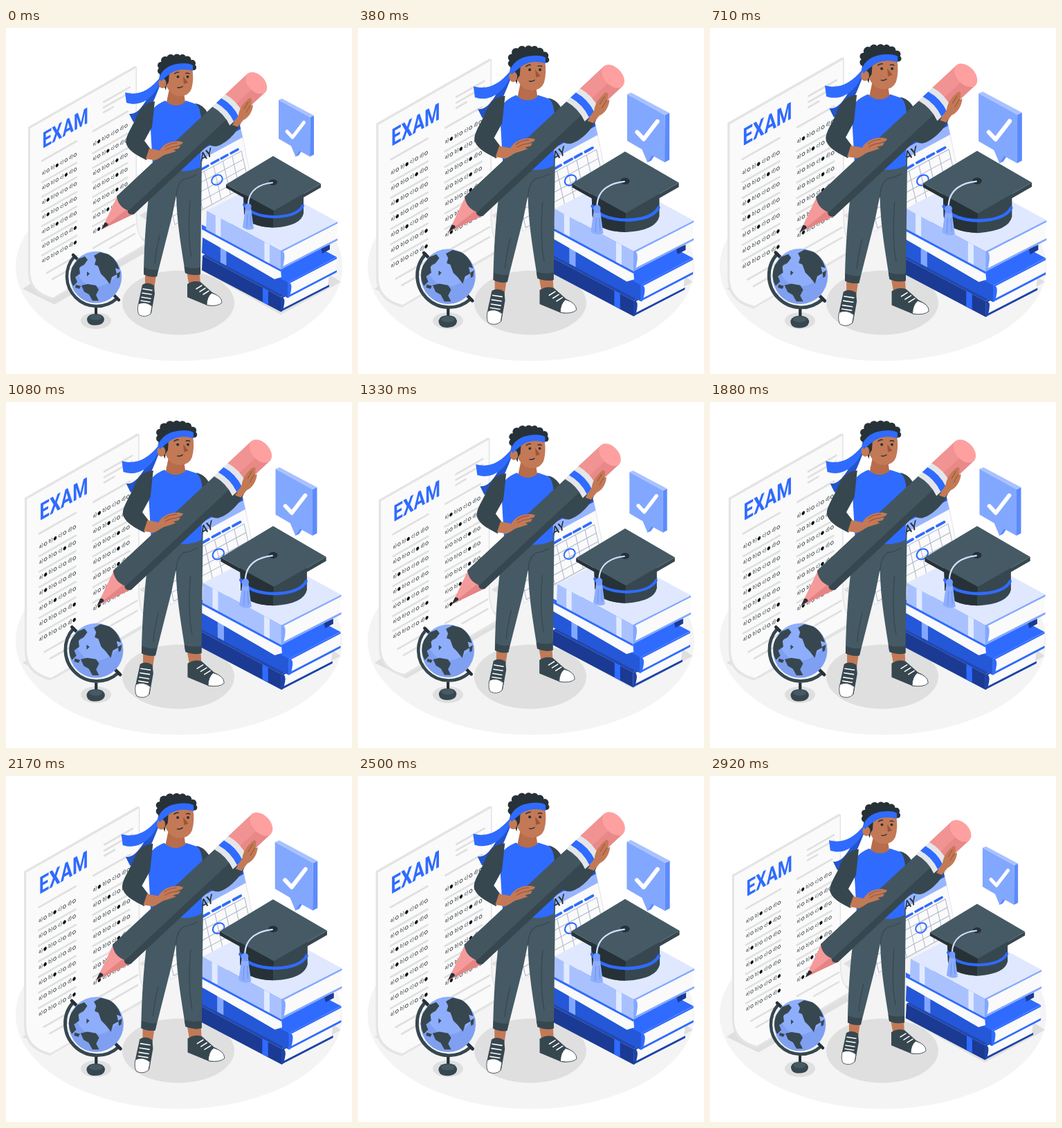
Animation, 500 px wide and 500 px high, one loop 2960 ms. Source, as an HTML page:

```html
<!DOCTYPE html>
<html lang="en">
<head>
<meta charset="utf-8">
<title>Exam time</title>
<style>
html,body{margin:0;width:100%;height:100%;overflow:hidden;background:#fff}
svg{display:block;width:100vw;height:100vh}
text{font-family:Roboto,"Open Sans",sans-serif}
.n{fill:none;stroke-linecap:round;stroke-linejoin:round}
.skin{fill:#c37956}
</style>
</head>
<body>
<svg viewBox="0 0 500 500">
<!-- floor -->
<ellipse cx="250" cy="345" rx="236" ry="136" fill="#f4f4f4"/>
<ellipse cx="249" cy="397" rx="81" ry="46.5" fill="#dfdfdf"/>
<ellipse cx="130" cy="423" rx="22" ry="12" fill="#dfdfdf"/>
<path d="M24 377L70 399.500 215 317 180 290 36 369zM280 349L397 414 484 367 466 355 370 330zM193 271L208 262 240 280 222 290z" fill="#dfdfdf"/>

<g id="exam">
  <path d="M32 143L186 55 189 56 189 268C189 295 195 307 206 313L67 393C46 387 32 377 32 350z" fill="#e4e4e4"/>
  <path d="M35 145L187.500 58 187.500 268C187.500 294 193 305 203 311L68 389.500C48 384 35 374 35 350z" fill="#fafafa"/>
  <path id="rules" class="n" stroke="#e0e0e0" stroke-width="2.600"/>
  <text transform="matrix(.755,-.43,0,1,52.500,174.500)" font-size="32" font-weight="bold" fill="#2f6bff">EXAM</text>
  <g id="answers" fill="#263238"></g>
</g>

<g id="calendar">
  <path d="M224 196L337 136 342 158 353 212 356 222 240 289 229 218z" fill="#fafafa" stroke="#e2e5ec"/>
  <path d="M224 196L337 136 342 158 229 219z" fill="#97b5ff"/>
  <path d="M224 196L337 136 339 146 226 206z" fill="#2456d0"/>
  <text transform="matrix(.866,-.49,.18,1,269,201)" font-size="16.500" font-weight="500" fill="#263238">MAY</text>
  <path id="grid" class="n" stroke="#aeb6cc" stroke-width="1"/>
  <path class="n" stroke="#2f6bff" stroke-width="3.600" stroke-linecap="butt" d="M283 204l9-5M297 196l10-5.500M311 188.500l9-5M325 181l10-5.500"/>
  <ellipse class="n" cx="305" cy="219.500" rx="8.300" ry="6.600" transform="rotate(-35 305 219.500)" stroke="#2f6bff" stroke-width="2"/>
</g>

<g id="globe">
  <path class="n" d="M99 330A43.200 43.200 0 0 0 160 391" stroke="#37474f" stroke-width="4.500"/>
  <path class="n" d="M97 328l6 6M156 386l7 7" stroke="#263238" stroke-width="4.500"/>
  <circle cx="130" cy="360" r="37.300" fill="#8eaefc"/>
  <path d="M98 342C112 390 150 376 166 350C170 376 154 397 130 397.300C100 397 88 368 98 342z" fill="#7f9ff0"/>
  <path d="M96 345L104 334 114 330 118 335 113 342 108 345 111 341 106 347 107 355 100 360 103 367 97 373C92 364 92 354 96 345zM127 329L136 324 148 327C158 333 162 342 164 349L158 347 160 356 153 360 150 370 143 361 137 355 133 344 128 342 130 335zM109 372L118 370 130 372 134 378 130 386 134 394 125 394 120 385 113 381zM101 371l7 2-2 4-6-2zM160 355l5-3-1 8-3 2zM117 352l4 3-4 4z" fill="#37474f"/>
  <path d="M128 404h4v10h-4z" fill="#263238"/>
  <path d="M117 420Q119 413 129.500 413T142 420Q142 429 129.500 429.500T117 420z" fill="#37474f"/>
  <ellipse cx="129.500" cy="418" rx="9" ry="4" fill="#455a64"/>
</g>

<g id="books"></g>

<g id="hat">
  <path d="M343 236L344 268Q350 288 388 288.500Q426 286 430 268V236z" fill="#37474f"/>
  <path d="M343 236L344 268Q350 287 386 288.500V262z" fill="#263238"/>
  <path class="n" d="M344 255Q354 272 388 273Q421 272 429 257" stroke="#2f6bff" stroke-width="4" stroke-linecap="butt"/>
  <path d="M318 226L387 264V269.500L318 231z" fill="#263238"/>
  <path d="M455 225L387 264V269.500L455 230.500z" fill="#37474f"/>
  <path d="M318 226L386 185 455 225 387 264z" fill="#455a64"/>
  <ellipse cx="386" cy="223" rx="6" ry="4.200" fill="#263238"/>
  <path class="n" d="M385 223.500C370 225 350 232 350 256" stroke="#d4e0ff" stroke-width="2"/>
  <path d="M346 260L342 288Q350 294 358 290L354 260z" fill="#8eaefc"/>
  <circle cx="350" cy="258" r="4.600" fill="#7199ff"/>
  <path class="n" d="M346 263h8M349 270l-1 18M353 270l1 16" stroke="#6c92f5" stroke-width="1"/>
</g>

<g id="bubble">
  <path d="M439.500 129L445 126.500V183L439 186z" fill="#5c8bfa"/>
  <path d="M394 104L399 102 445 126.500 439.500 129z" fill="#a9c2ff"/>
  <path d="M418 186L423 184 427 178 420 174z" fill="#5c8bfa"/>
  <path d="M394 104L439.500 129V186L424 177.500 418.500 186 412 170.500 394 160z" fill="#82a7ff"/>
  <path class="n" d="M406 149.500l8 8.500 16.500-21.500" stroke="#fff" stroke-width="5"/>
</g>

<g id="person">
  <!-- ribbons -->
  <path d="M219 76C206 95 196 126 178 124L184 136C206 130 213 106 223 82z" fill="#2354cc"/>
  <path d="M223 71C206 92 190 98 172 93L174 108C196 115 214 100 224 77z" fill="#2f6bff"/>
  <!-- legs and shoes -->
  <path class="skin" d="M201 354L217 357 214 377 201 376zM261 352L280 354 281 372 265 374z"/>
  <path d="M197 371Q205 366 214 372L215 384 210 412Q202 419 192 414Q189 407 192 394z" fill="#37474f"/>
  <path d="M191 399Q201 394 211 402L209 413Q202 419 193 415Q189 411 191 399z" fill="#fff" stroke="#37474f" stroke-width=".8"/>
  <path d="M262 370Q271 364 281 367L298 382Q312 388 312 397Q306 403 291 401L262 389z" fill="#37474f"/>
  <path d="M297 383Q312 387 312 397Q306 403 290 400.500Q290 389 297 383z" fill="#fff" stroke="#37474f" stroke-width=".8"/>
  <path class="n" d="M198 377l13 2M197 383l13 2M196 389l13 2M195 394l13 2M275 377l8-5M280 381l8-5M285 385l8-5" stroke="#fff" stroke-width="1.500"/>
  <path d="M213 192C206 240 200 290 199 356Q208 361 218 359L240 272 246 242C247 285 254 320 259 354Q271 359 281 356L283 190z" fill="#455a64"/>
  <path d="M199.500 346Q210 351 220 349L218 359Q208 361 199 356zM257.500 345Q270 349 281 346V356Q270 359 259 354z" fill="#37474f"/>
  <path class="n" d="M246 243C247 230 250 222 258 218M275 212Q264 218 258 218M222 300Q216 325 215 340M266 250Q262 300 268 330" stroke="#37474f" stroke-width="1.200"/>
  <!-- torso and far arm -->
  <path d="M274 109C290 112 296 130 300 146L321 131 339 138C332 154 316 168 304 171C285 172 280 150 276 140z" fill="#37474f"/>
  <path d="M230 105Q245 116 260 105L275 110Q284 118 282 150L281 201Q264 209 250 206L212 198 208 130Q208 114 230 105z" fill="#2f6bff"/>
  <path d="M236 88L232 107Q246 117 259 107L257 94z" fill="#b76c4b"/>
  <!-- head -->
  <g fill="#263238" id="curls"><path d="M222 70Q222 43 247 42Q270 43 272 58L234 68 231 90z"/></g>
  <path class="skin" d="M231 66Q250 52 269 58Q272 74 268 88Q264 98 252 98.500Q239 98 234 88L229 80z"/>
  <path d="M229 67L236 64 235 78 231 84z" fill="#263238"/>
  <ellipse class="skin" cx="226" cy="80" rx="5.600" ry="7"/>
  <path d="M221 72Q228 54 250 51.500Q264 50 270 54L270 62Q254 57 240 64Q231 70 224 77z" fill="#2f6bff"/>
  <path d="M256 70L263 79 257 81z" fill="#9c5538"/>
  <path class="n" d="M243.500 66q3-2.500 6-2M260 65.500q3-1 5 .5M248 86q4 1 7-1.500" stroke="#263238" stroke-width="1.400"/>
  <g fill="#263238"><circle cx="248.500" cy="70.500" r="1.900"/><circle cx="262.500" cy="70.500" r="1.900"/></g>
  <!-- pencil -->
  <g transform="translate(171 257.500) rotate(-43)">
    <path d="M4 -18L-47 2 4 18z" fill="#f59a9a"/>
    <path d="M4 6L-47 2 4 18z" fill="#e58484"/>
    <path d="M-47 2L-37 -2Q-33 1 -36 4z" fill="#263238"/>
    <path d="M2 -18H198V18H2Q-6 13 0 7Q-7 -5 2 -18z" fill="#37474f"/>
    <path d="M2 -18H198V9L0 9Q-7 -5 2 -18z" fill="#43565f"/>
    <path d="M216 -18.500H262V18.500H216z" fill="#e98888"/>
    <path d="M216 -18.500H262V2H216z" fill="#f29393"/>
    <ellipse cx="261" cy="0" rx="12" ry="18.500" fill="#ffa0a0"/>
    <path d="M191 -18.500H217Q223 0 217 18.500H191Q197 0 191 -18.500z" fill="#e4e6ea"/>
    <path d="M199 -18.500H209Q215 0 209 18.500H199Q205 0 199 -18.500z" fill="#2f6bff"/>
  </g>
  <!-- near arm and hands -->
  <path d="M215 106C200 107 193 116 187 132C180 147 171 159 174 168C178 179 192 185 203 191L209 175 200 163 211 143z" fill="#37474f"/>
  <path class="skin" d="M207 174L222 177C228 167 238 163 250 163.500L256 165 254 168 244 171 252 170 250 174 242 176 246 178 234 182C226 183 220 191 214 191L202 189z"/>
  <path class="skin" d="M327 140L336 126C337 117 342 109 352 101L355 103 354 112 357 111C356 122 350 130 343 133L335 143z"/>
  <path class="n" d="M230 172q7-6 17-6M231 176q8-5 16-5M344 117l6-10M347 122l6-10" stroke="#9c5538" stroke-width="1"/>
</g>
</svg>
<script>
const $ = id => document.getElementById(id);
const poly = (pts, fill) => `<path d="M${pts.join('L')}z" fill="${fill}"/>`;

// exam sheet: ruled lines and answer rows
const SLOPE = -.57;
const rule = (x, y, w) => `M${x} ${y}l${w} ${w * SLOPE}`;
let rules = rule(141, 107, 38) + rule(141, 115, 38) + rule(141, 122, 14) +
  rule(52, 192, 50) + rule(126, 149, 50) + rule(59, 354, 44) + rule(67, 363, 30) +
  rule(126, 318, 60) + rule(150, 318, 36);
let answers = '';
const columns = [[52, 212.5, [1, 2, 0, 0, 1, 3, 3]], [125.500, 170.5, [0, 1, 2, 2, 2, 1, 0]]];
for (const [x, y0, marks] of columns) marks.forEach((mark, r) => {
  const y = y0 + r * 21.1;
  if (r) rules += rule(x, y - 10.5, 50);
  [...'abcd'].forEach((ch, i) => {
    const dx = i * 13.1;
    answers += `<g transform="matrix(.866,-.5,0,1,${x + dx},${y + dx * SLOPE})">
      <text font-size="7">${ch})</text>
      <ellipse cx="10" cy="-1.600" rx="2.100" ry="2.200" fill="${i == mark ? '#000' : 'none'}" stroke="#263238" stroke-width=".8"/></g>`;
  });
});
$('rules').setAttribute('d', rules);
$('answers').innerHTML = answers;

// calendar grid
let grid = '';
for (let i = 0; i < 5; i++) grid += `M${233 + i * 2.7} ${236 + i * 12}l107 -58`;
for (let i = 0; i < 9; i++) grid += `M${233 + i * 13.4} ${236 - i * 7.25}l11 48`;
$('grid').setAttribute('d', grid);

// a book from its front, left and right top corners and its height
function book([fx, fy], [lx, ly], [rx, ry], h, top, spine, cover, band, bands) {
  const at = (k, d) => [fx + (lx - fx) * k, fy + (ly - fy) * k + d];
  const edge = (d, w) => poly([[fx, fy + d], [rx, ry + d], [rx, ry + d + w], [fx, fy + d + w]], cover);
  let s = poly([[fx, fy], [lx, ly], [lx + rx - fx, ly + ry - fy], [rx, ry]], top);
  s += poly([[fx, fy], [rx, ry], [rx - 2, ry + h], [fx, fy + h]], '#fafafa');
  s += edge(0, 2.5) + edge(h - 3, 3);
  s += `<path d="M${fx} ${fy}q7 -1 5 ${h / 2}t-5 ${h / 2}z" fill="${cover}"/>`;
  s += poly([[fx, fy], [lx, ly], [lx - 1, ly + h], [fx, fy + h]], spine);
  for (const k of bands) s += poly([at(k, 0), at(k + .07, 0), at(k + .07, h), at(k, h)], band);
  return s;
}
$('books').innerHTML =
  book([397, 389], [284, 329], [467, 353], 21, '#2148b0', '#1a3a94', '#1d43a8', '#2f6bff', [.16]) +
  book([407, 368], [284, 303], [478, 331], 22, '#2f6bff', '#2458d8', '#2f6bff', '#82a7ff', [.72]) +
  poly([[455, 318], [468, 313], [468, 320], [457, 326]], '#1a3a94') +
  // page edges and cover between the two upper spines
  poly([[285, 290], [397, 350], [398, 360], [388, 363], [285, 303]], '#fafafa') +
  poly([[283, 284], [397, 346], [397, 352], [283, 291]], '#2f6bff') +
  book([397, 322], [290, 264], [479, 280], 27, '#dfe8ff', '#a9c2ff', '#82a7ff', '#e2eaff', [.15, .81]);

// curly hair
const curls = [[224, 62, 5], [224, 54, 5], [230, 47, 6], [238, 44, 6], [247, 43, 5.5], [255, 43, 5], [262, 46, 5.5], [269, 51, 5], [271, 57, 4]];
$('curls').innerHTML += curls.map(([x, y, r]) => `<circle cx="${x}" cy="${y}" r="${r}"/>`).join('');

// pulse: [ms, amount] for the first half of the loop, mirrored in the second
const HALF = 1480;
const pulse = [[0, 0], [40, .02], [250, .57], [380, .9], [460, 1], [560, 1.24], [790, .94], [1080, .8], [1380, .2], [HALF, 0]];
const slopeAt = i => {
  const a = pulse[i - 1], b = pulse[i + 1];
  return a && b ? (b[1] - a[1]) / (b[0] - a[0]) : 0;
};
function amount(t) {
  t %= 2 * HALF;
  if (t > HALF) t = 2 * HALF - t;
  let i = 0;
  while (i < pulse.length - 2 && t > pulse[i + 1][0]) i++;
  const [t0, v0] = pulse[i], [t1, v1] = pulse[i + 1];
  const d = t1 - t0, u = (t - t0) / d, w = u * u * (3 - 2 * u);
  return v0 + (v1 - v0) * w + d * u * (1 - u) * (slopeAt(i) * (1 - u) - slopeAt(i + 1) * u);
}

// id, pivot x, pivot y, growth
const parts = [
  ['exam', 123, 224, .07], ['calendar', 272, 212, .07], ['globe', 126, 376, .07],
  ['books', 381, 309, .07], ['hat', 386.5, 236.5, .14], ['bubble', 419.5, 145, .22],
  ['person', 254, 231, .07]
].map(([id, x, y, k]) => ({ el: $(id), x, y, k }));

const start = performance.now();
function draw() {
  const a = amount(Math.max(0, performance.now() - start));
  for (const { el, x, y, k } of parts) {
    const s = 1 + k * a;
    el.setAttribute('transform', `translate(${x} ${y}) scale(${s}) translate(${-x} ${-y})`);
  }
  requestAnimationFrame(draw);
}
draw();
</script>
</body>
</html>
```
